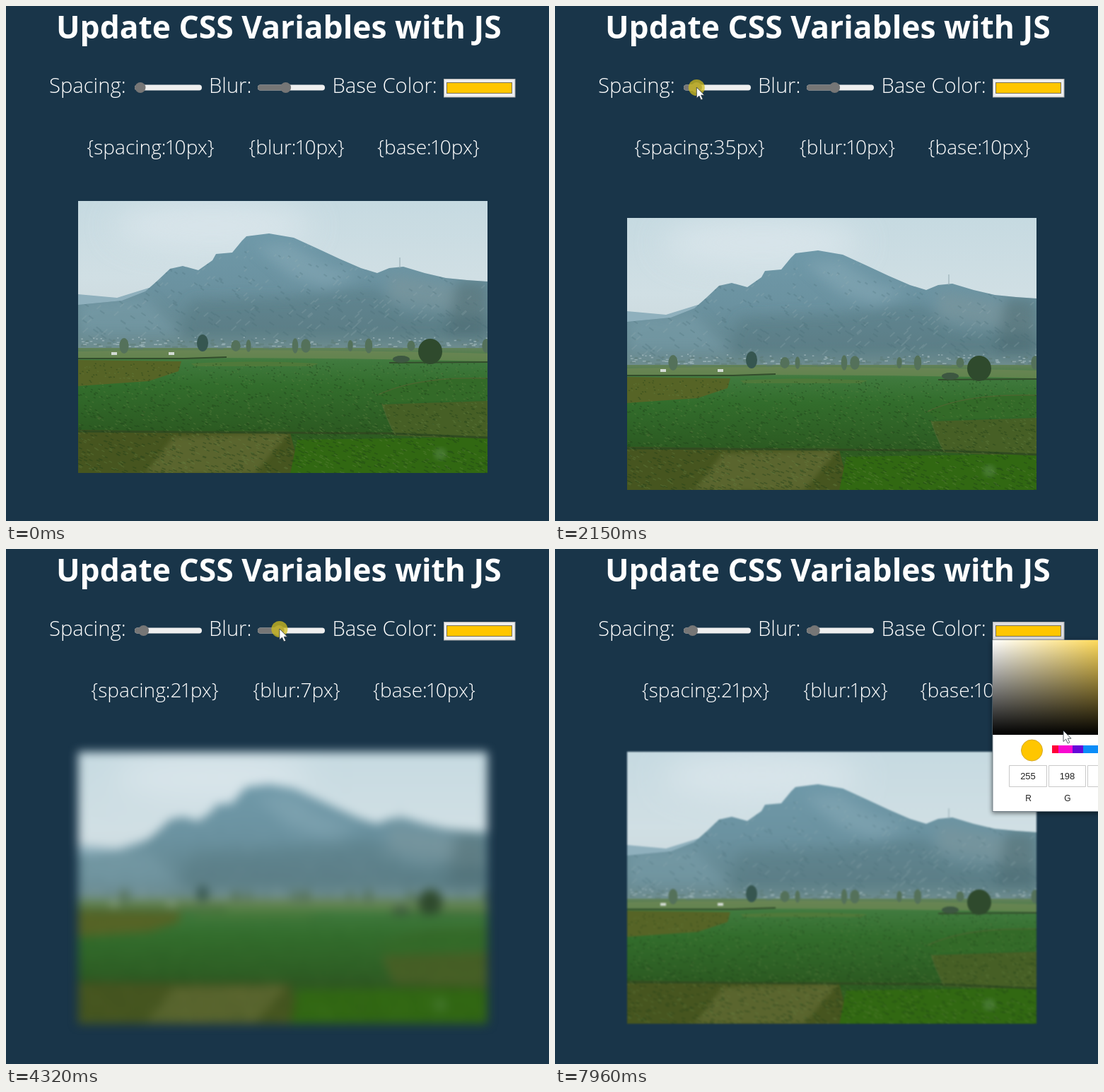
These frames come from a looping animation (768 px wide and 729 px high, 8000 ms). An HTML page:

```html
<!DOCTYPE html>
<html lang="en">
<head>
<meta charset="utf-8">
<title>Update CSS Variables with JS</title>
<style>
  html, body { margin: 0; width: 100%; height: 100%; overflow: hidden; background: #193549; }
  svg { display: block; width: 768px; height: 729px; }
  text { fill: #fff; font-family: "Open Sans", "Noto Sans", sans-serif; }
  .title { font-size: 44.4px; font-weight: 700; }
  .label { font-size: 29.2px; font-weight: 340; }
  .vars { font-size: 28.1px; font-weight: 340; text-anchor: middle; }
  .picker text { fill: #222; font: 13px "Liberation Sans", Arial, sans-serif; text-anchor: middle; }
</style>
</head>
<body>
<svg viewBox="0 0 768 729" xmlns="http://www.w3.org/2000/svg">
  <defs>
    <filter id="soft" filterUnits="userSpaceOnUse" x="-45" y="-45" width="669" height="475" color-interpolation-filters="sRGB">
      <feGaussianBlur id="blur" stdDeviation="0"/>
    </filter>
    <filter id="mist" x="-50%" y="-50%" width="200%" height="200%"><feGaussianBlur stdDeviation="22"/></filter>
    <filter id="haze" x="-20%" y="-20%" width="140%" height="140%"><feGaussianBlur stdDeviation="9"/></filter>
    <filter id="shade" x="-10%" y="-10%" width="120%" height="120%"><feGaussianBlur stdDeviation="3"/></filter>
    <clipPath id="frame"><path d="M0 0H579V385H0Z"/></clipPath>
    <clipPath id="slope"><use href="#ridge"/></clipPath>
    <linearGradient id="sky" x2="0" y2="1">
      <stop stop-color="#c6dae1"/><stop offset=".5" stop-color="#d0dfe4"/><stop offset="1" stop-color="#c9d4d8"/>
    </linearGradient>
    <linearGradient id="rock" x2="0" y2="1">
      <stop stop-color="#6f99a9"/><stop offset=".45" stop-color="#6b92a0"/>
      <stop offset=".8" stop-color="#63868f"/><stop offset="1" stop-color="#73908f"/>
    </linearGradient>
    <linearGradient id="field" x2="0" y2="1">
      <stop stop-color="#63815a"/><stop offset=".1" stop-color="#407a3e"/><stop offset=".3" stop-color="#326d2c"/>
      <stop offset=".65" stop-color="#2c5b22"/><stop offset="1" stop-color="#355f1b"/>
    </linearGradient>
    <linearGradient id="tint"><stop stop-color="#fff"/><stop offset="1" stop-color="#ffc600"/></linearGradient>
    <linearGradient id="dark" x2="0" y2="1"><stop stop-opacity="0"/><stop offset="1"/></linearGradient>
  </defs>
  <rect width="768" height="729" fill="#193549"/>
  <text class="title" x="71" y="46">Update CSS Variables with JS</text>
  <g class="label">
    <text x="61" y="123">Spacing:</text><text x="287" y="123">Blur:</text><text x="461.5" y="123">Base Color:</text>
  </g>
  <g id="sliders"></g>
  <rect id="button" x="619.5" y="103.5" width="100.5" height="25.5" stroke="#b0b0b0"/>
  <rect x="623.5" y="108.5" width="92" height="15" fill="#ffc600" stroke="#7a7358"/>
  <g class="vars"><text y="210"></text><text y="210"></text><text y="210"></text></g>

  <g id="photo"><g clip-path="url(#frame)">
    <rect width="579" height="215" fill="url(#sky)"/>
    <ellipse cx="190" cy="35" rx="140" ry="35" fill="#dfe9ee" opacity=".7" filter="url(#mist)"/>
    <g transform="translate(0 1)">
      <path d="M0 131L55 136L100 122L150 130V215H0Z" fill="#8fb0bd"/>
      <path id="ridge" d="M0 146L62 140L95 127L112 112L130 95L148 91L170 97L190 83L195 74L218 72L232 55L238 49L270 45L305 51L340 67L370 81L400 94L423 101L440 94L460 92L490 101L520 108L550 111L579 113V215H0Z" fill="url(#rock)"/>
      <g clip-path="url(#slope)">
        <g filter="url(#haze)">
          <path d="M250 62L300 60L350 90L395 104L350 122L300 105Z" fill="#86a9b6" opacity=".6"/>
          <path d="M440 103L579 126V165L440 140Z" fill="#7e979d" opacity=".6"/>
          <path d="M160 140L300 135L420 120L460 160L579 165V195H140Z" fill="#53767e" opacity=".45"/>
          <path d="M535 112H579V190H520Z" fill="#4b686c" opacity=".5"/>
          <path d="M0 140L95 135L150 190H0Z" fill="#7c9fab" opacity=".6"/>
        </g>
        <g id="rocks"></g>
      </g>
      <path d="M455 79V94" stroke="#92a8b0"/>
      <rect y="207" width="579" height="178" fill="url(#field)"/>
      <path d="M0 212Q280 207 579 215V226Q300 219 0 222Z" fill="#6f8855" opacity=".7"/>
      <path d="M0 224L146 226L142 240L100 254L0 261Z" fill="#566426"/>
      <path d="M160 229Q240 224 340 229L330 233H165Z" fill="#4f793a"/>
      <path d="M430 287L579 282V337L447 331Z" fill="#465f25"/>
      <path d="M425 274Q480 248 579 250V280L440 284Z" fill="#336a28"/>
      <path d="M0 323L300 327L315 385H0Z" fill="#46551f"/>
      <path d="M135 333L298 327L250 385H95Z" fill="#5f6932" opacity=".8" filter="url(#shade)"/>
      <path d="M310 337L579 333V385H300Z" fill="#316812"/>
      <path d="M0 325L440 328L579 334" fill="none" stroke="#304b20" stroke-width="3"/>
      <path d="M430 286Q438 312 449 330M425 273Q480 247 579 250" fill="none" stroke="#4a662f" stroke-width="1.5"/>
      <g id="crops"></g>
      <path d="M0 222L150 222L210 220M440 228L579 227" fill="none" stroke="#334d2c" stroke-width="2"/>
      <g id="town"></g>
      <path d="M47 215H55M128 215H136" stroke="#d3dbd4" stroke-width="4"/>
      <g id="trees"></g>
      <circle cx="512" cy="357" r="9" fill="#5f8c52" opacity=".45" filter="url(#shade)"/>
    </g>
  </g></g>

  <g id="picker" class="picker">
    <rect x="618" y="130" width="262" height="244" opacity=".5" filter="url(#shade)"/>
    <rect x="619" y="129" width="260" height="242.5" fill="#fff" stroke="#77838c"/>
    <rect x="619" y="129" width="232" height="134" fill="url(#tint)"/>
    <rect x="619" y="129" width="232" height="134" fill="url(#dark)"/>
    <circle cx="674.5" cy="285" r="15" fill="#ffc600" stroke="#d5a92a"/>
    <g fill="none" stroke-width="11">
      <path d="M703 283.5H713" stroke="#ff0038"/><path d="M712 283.5H733" stroke="#f808d0"/>
      <path d="M732 283.5H747" stroke="#6508d8"/><path d="M747 283.5H768" stroke="#0a8cf8"/>
    </g>
    <path d="M642.5 306.5h53v30h-53zM698.5 306.5h52v30h-52zM753.5 306.5h53v30h-53z" fill="#fff" stroke="#c9c9c9"/>
    <text x="669" y="326">255</text><text x="724.5" y="326">198</text>
    <text x="669.5" y="357" style="font-size:12px">R</text><text x="725" y="357" style="font-size:12px">G</text>
  </g>
  <g id="hint">
    <path d="M619 129V372H768V129Z" fill="#0b2030" opacity=".06"/>
    <path d="M618 129V373H768" fill="none" stroke="#0a1a26" stroke-width="4" opacity=".3" filter="url(#shade)"/>
    <path d="M618.5 129V372H768" fill="none" stroke="#6c7c86" opacity=".6"/>
  </g>
  <circle id="press" r="11.5" fill="#d2be1e" opacity=".75"/>
  <path id="cursor" d="M0 0V15.5L3.6 12.2L6.2 18L8.8 16.8L6.3 11.2H11Z" fill="#fff" stroke="#26343e" stroke-width=".8"/>
</svg>
<script>
const $ = id => document.getElementById(id);
const set = (el, attrs) => { for (const k in attrs) el.setAttribute(k, attrs[k]); return el; };
const add = (parent, tag, attrs) =>
  parent.appendChild(set(document.createElementNS("http://www.w3.org/2000/svg", tag), attrs));
const mix = (a, b, q) => a + (b - a) * q;

let seed = 7;
const rand = () => (seed = (seed * 16807) % 2147483647) / 2147483647;

// Short strokes across the photo between two heights, growing towards the bottom.
function scatter(id, n, top, bottom, size, slope, stroke, opacity) {
  let d = "";
  for (let i = 0; i < n; i++) {
    const depth = rand(), len = size * (.5 + depth);
    d += `M${(rand() * 579).toFixed(1)} ${mix(top, bottom, depth).toFixed(1)}l${len.toFixed(1)} ${(len * slope).toFixed(1)}`;
  }
  add($(id), "path", { d, fill: "none", stroke, "stroke-width": size * .4, opacity });
}

function buildPhoto() {
  scatter("rocks", 260, 60, 195, 5, .7, "#456a72", .22);
  scatter("rocks", 180, 60, 195, 5, -.9, "#9ab3b8", .22);
  scatter("crops", 1300, 228, 383, 3.5, .4, "#1d3d18", .4);
  scatter("crops", 900, 232, 383, 3.2, .5, "#6a8a48", .32);
  scatter("town", 110, 195, 208, 6, 0, "#5c7b75", .5);
  scatter("town", 110, 192, 206, 4, 0, "#bccdd1", .5);

  const tree = (cx, cy, rx, ry, fill) => add($("trees"), "ellipse", { cx, cy, rx, ry, fill });
  for (const x of [65, 223, 241, 307, 322, 385, 411, 471, 577])
    tree(x, 204, 3 + rand() * 4, 7 + rand() * 5, "#54715a");
  tree(457, 223, 12, 5, "#3d5741");
  tree(176, 200, 8, 12, "#365650");
  tree(498, 212, 17, 18, "#2f4a2d");
}

// Each track is 95 wide; the thumb centre runs over 79 of it.
const tracks = {
  spacing: { x: 182, part: v => (v - 10) / 190 },
  blur: { x: 356, part: v => v / 25 }
};
const thumbX = (name, v) => tracks[name].x + 8 + tracks[name].part(v) * 79;

function buildSlider(track) {
  const bar = { x: track.x, y: 111.6, height: 7.9, rx: 3.9 };
  add($("sliders"), "rect", { ...bar, width: 95, fill: "#efefef" });
  track.fill = add($("sliders"), "rect", { ...bar, fill: "#767676" });
  track.thumb = add($("sliders"), "circle", { cy: 115.5, r: 7.5, fill: "#767676" });
}

function drawSlider(name, v) {
  const cx = thumbX(name, v), { x, fill, thumb } = tracks[name];
  set(fill, { width: cx - x });
  set(thumb, { cx });
}

const glide = (start, end, x, y) => ({ start, end, x, y });
const drag = (start, end, name, value) => ({ start, end, name, value, held: true });
const click = (start, end) => ({ start, end, held: true });

const acts = [
  glide(70, 520, 266, 212), glide(670, 1130, 189, 115),
  drag(1300, 1600, "spacing", 54), drag(1920, 2460, "spacing", 23), drag(2690, 2760, "spacing", 21),
  glide(2770, 2920, 402, 122), glide(3160, 3600, 396, 113),
  drag(3610, 3940, "blur", 9), drag(4030, 4860, "blur", 5), drag(5090, 5250, "blur", 6),
  drag(5400, 5870, "blur", 2), drag(6020, 6240, "blur", 1),
  glide(6250, 6700, 562, 112), click(6720, 6870),
  glide(6950, 7650, 674, 160), glide(7730, 7960, 719, 257)
];

// The screen refreshes once per beat, and every act eases out.
const beat = 77;
function progress(t, { start, end }) {
  const steps = Math.floor((t - start) / beat + .1) + 1;
  return 1 - (1 - Math.min(1, steps * beat / (end - start + beat))) ** 1.4;
}

function stateAt(t) {
  const s = { spacing: 10, blur: 10, x: 663, y: 773, held: false };
  for (const act of acts) {
    if (t < act.start) break;
    const q = progress(t, act);
    s.held = act.held && (act.name || t < act.end);
    if (act.name) {
      s[act.name] = mix(s[act.name], act.value, q);
      s.x = thumbX(act.name, s[act.name]);
    } else if (!act.held) {
      s.x = mix(s.x, act.x, q);
      s.y = mix(s.y, act.y, q);
    }
  }
  s.spacing = Math.round(s.spacing);
  s.blur = Math.round(s.blur);
  return s;
}

const texts = document.querySelectorAll(".vars text");
function drawVars(spacing, blur) {
  const items = [["spacing", spacing, 153], ["blur", blur, 103], ["base", 10, 113]];
  const widths = items.map(([, v, w]) => w + String(v).length * 17 - (String(v).split("1").length - 1) * 5);
  const gap = 49.5;
  let x = 391 - (widths[0] + widths[1] + widths[2] + 2 * gap) / 2;
  items.forEach(([name, v], i) => {
    set(texts[i], { x: x + widths[i] / 2 });
    // The digit 1 sits closer to its neighbours.
    texts[i].innerHTML = `{${name}:${v}px}`.replace(/1(.*)/, '<tspan dx="-2">1</tspan><tspan dx="-2">$1</tspan>');
    x += widths[i] + gap;
  });
}

const show = (id, on) => set($(id), { visibility: on ? "visible" : "hidden" });
let last = "";
function draw(t) {
  const s = stateAt(t), blurred = t >= 3160;
  const key = [s.spacing, s.blur, blurred].join();
  if (key != last) {
    last = key;
    drawVars(s.spacing, s.blur);
    drawSlider("spacing", s.spacing);
    drawSlider("blur", s.blur);
    set($("photo"), {
      transform: `translate(102 ${Math.floor(267 + .963 * s.spacing)})`,
      filter: blurred ? "url(#soft)" : "none"
    });
    set($("blur"), { stdDeviation: s.blur * .96 });
  }
  set($("button"), { fill: t >= 6790 ? "#dedee2" : "#efefef" });
  show("hint", t >= 6880 && t < 6950);
  show("picker", t >= 6950);
  set($("picker"), { opacity: t < 7030 ? .5 : 1 });
  show("press", s.held);
  set($("press"), { cx: s.x, cy: s.y + .5 });
  set($("cursor"), { transform: `translate(${s.x} ${s.y})` });
}

buildPhoto();
Object.values(tracks).forEach(buildSlider);
function tick() {
  draw(performance.now() % 8000);
  requestAnimationFrame(tick);
}
tick();
</script>
</body>
</html>
```
